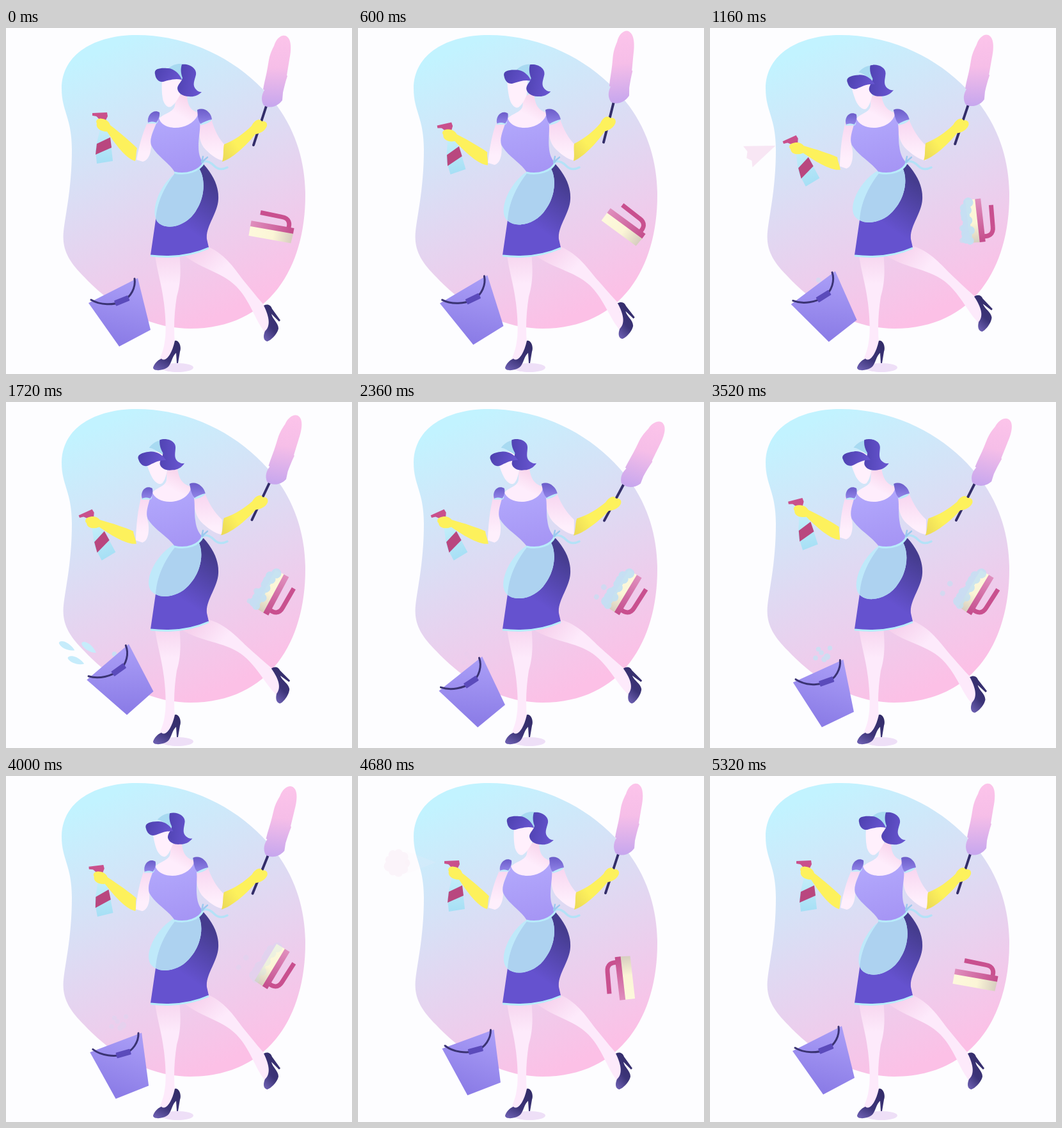
Recreate the animation shown at these times as an HTML page. Size 541 by 541 pixels, loop 5.36 s.

```html
<!DOCTYPE html>
<html lang="en">
<head>
<meta charset="utf-8">
<title>Cleaning</title>
<style>
html, body { margin: 0; width: 100%; height: 100%; overflow: hidden; background: #fdfdff; }
svg { display: block; width: 100vw; height: 100vh; }
</style>
</head>
<body>
<svg viewBox="0 0 541 541">
<defs>
  <linearGradient id="gBlob" gradientUnits="userSpaceOnUse" x1="150" y1="35" x2="335" y2="450"><stop stop-color="#c2f3ff"/><stop offset="1" stop-color="#fcc0e6"/></linearGradient>
  <linearGradient id="gSkirt" gradientUnits="userSpaceOnUse" x1="328" y1="245" x2="270" y2="330"><stop stop-color="#453c8e"/><stop offset=".8" stop-color="#6552cf"/></linearGradient>
  <linearGradient id="gDress" gradientUnits="userSpaceOnUse" x1="255" y1="140" x2="275" y2="230"><stop stop-color="#b2a8fc"/><stop offset="1" stop-color="#a594f4"/></linearGradient>
  <linearGradient id="gLeg" gradientUnits="userSpaceOnUse" x1="255" y1="350" x2="258" y2="400"><stop stop-color="#f6d4ee"/><stop offset="1" stop-color="#fdeafb"/></linearGradient>
  <linearGradient id="gLeg2" gradientUnits="userSpaceOnUse" x1="295" y1="345" x2="330" y2="385"><stop stop-color="#f6d0ec"/><stop offset="1" stop-color="#fdeafb"/></linearGradient>
  <linearGradient id="gArm" gradientUnits="userSpaceOnUse" x1="0" y1="145" x2="0" y2="195"><stop stop-color="#f8d6f0"/><stop offset="1" stop-color="#feeffc"/></linearGradient>
  <linearGradient id="gNeck" gradientUnits="userSpaceOnUse" x1="275" y1="108" x2="262" y2="132"><stop stop-color="#f9d8ee"/><stop offset="1" stop-color="#feedfc"/></linearGradient>
  <linearGradient id="gShoe" x1=".7" y1="0" x2=".2" y2="1"><stop stop-color="#332c69"/><stop offset=".6" stop-color="#3c3478"/><stop offset="1" stop-color="#6a5dae"/></linearGradient>
  <linearGradient id="gHair" x1="0" y1="0" x2="1" y2=".3"><stop stop-color="#4c40ae"/><stop offset="1" stop-color="#6654ce"/></linearGradient>
  <linearGradient id="gSleeve" x1="0" y1="0" x2="0" y2="1"><stop stop-color="#6b5cc9"/><stop offset="1" stop-color="#9084e8"/></linearGradient>
  <linearGradient id="gFeather" x1="0" y1="0" x2="0" y2="1"><stop stop-color="#fcc4ea"/><stop offset=".45" stop-color="#f6bee8"/><stop offset="1" stop-color="#c6a6ee"/></linearGradient>
  <linearGradient id="gBucket" gradientUnits="userSpaceOnUse" x1="200" y1="400" x2="178" y2="490"><stop stop-color="#a89cf6"/><stop offset="1" stop-color="#8c7de7"/></linearGradient>
  <linearGradient id="gGlove" gradientUnits="userSpaceOnUse" x1="340" y1="200" x2="362" y2="184"><stop stop-color="#eddc58"/><stop offset="1" stop-color="#fdf15c"/></linearGradient>
  <linearGradient id="gBristle"><stop stop-color="#fdf9dc"/><stop offset=".55" stop-color="#fbf5d6"/><stop offset="1" stop-color="#d6cdbf"/></linearGradient>
  <linearGradient id="gBar"><stop stop-color="#e08fbe"/><stop offset="1" stop-color="#c44d8c"/></linearGradient>
  <linearGradient id="gBottle" x1="0" y1="0" x2="0" y2="1"><stop stop-color="#c4eefa"/><stop offset="1" stop-color="#a6dff5"/></linearGradient>
  <clipPath id="skirtClip"><path id="skirt" d="M265 226L309 213C326 232 333 250 332 268C331 290 312 310 314 330L317 343C290 355 260 359 226 355L234 300C236 270 250 245 265 226Z"/></clipPath>
  <path id="apron" d="M265 227C280 227 292 222 300 217C312 232 312 262 298 284C285 308 255 317 240 306C228 297 232 275 240 258C247 244 255 234 265 227Z"/>
</defs>

<path fill="url(#gBlob)" d="M87 95C87 40 140 11 204 11C300 11 380 62 424 122C456 166 468 215 468 262C468 373 413 470 288 470C220 470 162 432 122 389C100 367 87 348 90 318C93 290 103 250 103 190C103 140 87 130 87 95Z"/>
<ellipse cx="268" cy="531" rx="25" ry="7" fill="#eedff7"/>

<g id="bubbles" fill="#bfe6f6"></g>
<g id="drops" fill="#c6ecfb"></g>
<g id="bucket">
  <path fill="url(#gBucket)" d="M129 430L206 391L226 472L177 498Z"/>
  <path fill="none" stroke="#3a3373" stroke-width="3" stroke-linecap="round" d="M133 425C148 434 168 433 181 428C196 421 203 405 201 392"/>
  <rect x="170" y="422" width="23" height="9" rx="1" fill="#5b4bbb" transform="rotate(-22 181 427)"/>
</g>

<g id="brush">
  <path fill="none" stroke="#c9508f" stroke-width="7" d="M-22 -21L12 -20C24 -20 27 -12 25 -2"/>
  <path fill="url(#gBristle)" d="M-34 2H34L33 18H-34Z"/>
  <rect x="-34" y="-6" width="68" height="9" fill="url(#gBar)"/>
  <g id="foam" fill="#c2e1f4"></g>
  <g id="stray" fill="#c6dff3"><circle cx="28" r="4"/><circle cx="9" cy="-2" r="4.500"/></g>
</g>

<g id="leg">
  <path fill="url(#gLeg2)" d="M272 350C300 376 336 380 360 404C380 424 390 456 402 472C404 476 406 478 408 474L414 462L408 438C400 430 388 415 374 398C358 378 345 355 316 342L290 340Z"/>
  <path fill="url(#gShoe)" d="M403 434C409 431 414 433 416 439L429 457L427 459L415 447C417 456 426 461 426 470C424 480 412 490 408 490C402 488 402 481 405 474C414 466 412 452 403 434Z"/>
</g>
<path fill="url(#gLeg)" d="M233 354C236 380 243 398 247 430C250 455 251 480 247 497C245 508 240 515 240 523L256 520L264 492C262 470 263 445 267 420C273 400 274 380 271 352Z"/>
<path fill="url(#gShoe)" d="M264 489C270 487 275 498 272 506L269 524H267L266 508C259 514 259 526 252 531C245 536 230 537 230 531C232 525 236 520 243 517C249 523 259 512 264 489Z"/>

<use href="#skirt" fill="url(#gSkirt)"/>
<path fill="none" stroke="#b6edfa" stroke-width="3" d="M226 356C260 360 290 356 317 344"/>
<use id="apronOut" href="#apron" fill="#bfe9fa"/>
<g clip-path="url(#skirtClip)"><use id="apronIn" href="#apron" fill="#add2f0"/></g>

<g id="torso">
  <path fill="url(#gArm)" d="M303 146C301 165 302 180 312 190C322 200 332 207 340 207L343 184C332 172 326 160 321 142Z"/>
  <path id="upperL" fill="url(#gArm)" d="M222 146C213 165 208 185 204 206L214 209C223 207 227 195 227 183C224 172 231 158 236 146Z"/>
  <path fill="url(#gNeck)" d="M236 147C240 134 262 134 264 121L266 108L283 100C283 115 285 128 300 132L302 140C286 162 250 160 236 147Z"/>
  <path id="face" fill="#fff0fc" d="M244 80C243 95 244 108 246 114C249 122 254 125 258 123C264 119 268 112 272 105L276 80C268 72 250 72 244 80Z"/>
  <path fill="url(#gDress)" d="M239 140C243 162 288 162 300 136C307 150 301 165 301 185C301 200 305 206 309 211C300 223 282 230 264 226C255 210 235 200 227 183C224 172 231 160 239 140Z"/>
  <path fill="none" stroke="#b8ebfa" stroke-width="3" d="M263 226C282 231 303 223 309 211"/>
  <g id="sleeveL">
    <path fill="#bfeafa" d="M221 150C226 149 233 150 236 149L238 145L222 146Z"/>
    <path fill="url(#gSleeve)" d="M222 148C220 136 231 126 240 132C241 139 238 143 235 148C231 146 226 146 222 148Z"/>
  </g>
  <path fill="#bfeafa" d="M303 148L321 142V145C316 149 309 151 304 152Z"/>
  <path fill="url(#gSleeve)" d="M299 128C310 123 321 132 322 143C316 144 309 147 304 150C299 142 300 135 299 128Z"/>
</g>
<path fill="none" stroke="#b4e2f7" stroke-width="3.500" stroke-linecap="round" d="M307 209C316 207 321 211 326 216C332 222 340 221 346 218"/>
<path fill="none" stroke="#9cc9ee" stroke-width="2.500" stroke-linecap="round" d="M306 210L308 201M307 210C311 204 314 204 315 202"/>

<path id="scarf" fill="#a8daf1" d="M253 64C262 56 271 55 278 57C276 64 277 74 278 82C270 80 264 68 253 64Z"/>
<path id="hair" fill="url(#gHair)" d="M275 57C286 55 299 63 297 73C295 82 290 90 298 97C301 100 304 100 306 100C300 106 293 108 286 107C276 107 268 101 268 94C269 87 275 84 276 78C273 70 273 63 275 57Z"/>
<path id="quiff" fill="url(#gHair)" d="M233 72C231 64 240 62 252 63C261 63 271 70 275 81C264 78 254 82 246 84C239 85 234 80 233 72Z"/>

<g id="foreR">
  <g id="duster">
    <path stroke="#332d69" stroke-width="4" stroke-linecap="round" d="M387 183L407 122"/>
    <path id="feather" fill="url(#gFeather)" d="M403 121C398 112 400 104 404 97L402 96C404 84 407 74 409 62L411 50C413 40 416 34 419 28C423 14 434 8 440 14C447 20 446 36 443 50L441 62L439 74L440 75C437 84 435 92 433 101L432 113C424 124 411 126 403 121Z"/>
  </g>
  <path fill="url(#gGlove)" d="M341 182C339 190 341 200 338 209C352 205 374 186 390 166C398 165 406 160 408 153C409 147 404 145 400 146C396 140 388 145 384 153C372 165 358 175 341 182Z"/>
</g>

<g id="foreL">
  <g id="spray">
    <path id="cone" fill="#f8e6f4" d="M122 135L75 117L78 127L73 136L79 143L76 153Z"/>
    <g id="cloud" fill="#fbf0f8"></g>
  </g>
  <path fill="url(#gBottle)" d="M147 156H158C160 165 163 172 164 180L167 208L142 212L140 192C141 178 146 168 147 156Z"/>
  <path fill="#b9477f" d="M142 181L163 171L165 187L140 198Z"/>
  <path fill="#c9508c" d="M135 133L158 132L159 138L156 144L157 156H148L147 143C144 142 143 139 141 138L135 137Z"/>
  <path fill="#fdf15c" d="M205 188C203 194 204 202 202 208C190 205 175 188 158 162C146 162 140 155 142 149C139 144 145 140 151 142C158 143 162 148 163 152C180 165 195 178 205 188Z"/>
</g>
</svg>

<script>
const LOOP = 5360, STEP = 40, SQUIRT = 640;
const squirts = [1080, 2680, 4200];
const $ = id => document.getElementById(id);
const clamp = x => Math.max(0, Math.min(1, x));
const move = (id, s) => $(id).setAttribute("transform", s);
const fade = (id, o) => $(id).setAttribute("opacity", o);

// Eased step from 0 to 1, and a rise followed by a fall.
function ramp(t, from, to) {
  const u = clamp((t - from) / (to - from));
  return u * u * (3 - 2 * u);
}
const pulse = (t, a, b, c, d) => ramp(t, a, b) - ramp(t, c, d);

let seed = 7;
const rand = (lo, hi) => lo + (hi - lo) * ((seed = seed * 16807 % 2147483647) / 2147483647);

function add(parent, tag, attrs) {
  const e = document.createElementNS("http://www.w3.org/2000/svg", tag);
  for (const k in attrs) e.setAttribute(k, attrs[k]);
  return $(parent).appendChild(e);
}
const dot = (parent, cx, cy, r) => add(parent, "circle", { cx, cy, r });

for (let x = -30; x <= 30; x += 4) dot("foam", x, rand(14, 24), rand(5, 8));
for (let i = 0; i < 6; i++) dot("bubbles", 165 + i * 4.5, rand(391, 411), rand(3, 5.5));
for (let a = 0; a < 6.2; a += Math.PI / 4.5) dot("cloud", 13 * Math.cos(a), 15 * Math.sin(a), rand(6, 8.5));
dot("cloud", 0, 0, 15);

const mouth = { x: 158, y: 408 };
const drops = [[96, 382, 20], [130, 384, 28], [110, 404, 14]].map(([x, y, turn]) =>
  ({ x, y, turn, el: add("drops", "path", { d: "M14 2C6 7 -8 6 -13 0C-14 -4 -8 -6 -2 -5C5 -4 10 -1 14 2Z" }) }));

function splash(t) {
  const u = clamp((t - 1440) / 560);
  const go = 1.3 * (1 - (1 - u) ** 2.2), size = clamp(u * 4) * clamp((1 - u) * 3);
  for (const { x, y, turn, el } of drops) {
    const px = mouth.x + (x - mouth.x) * go, py = mouth.y + (y - mouth.y) * go + 22 * (u * u - .25);
    el.setAttribute("transform", `translate(${px} ${py}) rotate(${turn}) scale(${size})`);
  }
}

function squirt(t) {
  const s = squirts.find(s => t >= s && t < s + SQUIRT);
  $("spray").style.display = s === undefined ? "none" : "";
  if (s === undefined) return;
  const u = t - s, reach = clamp((u + 30) / 110), grow = clamp((u - 80) / 200);
  move("cone", `translate(122 135) scale(${reach}) translate(-122 -135)`);
  fade("cone", 1 - clamp((u - 160) / 360));
  move("cloud", `translate(${80 - 19 * grow} 136) scale(${grow})`);
  fade("cloud", 1 - clamp((u - 400) / 240));
}

function body(t) {
  const lean = pulse(t, 200, 1000, 3400, 4700);
  const arm = pulse(t, 200, 1040, 2500, 4640);
  const nod = pulse(t, 200, 1700, 3400, 4680);
  // Shear that leaves the waist at y = 225 in place.
  move("torso", `matrix(1 0 ${lean / 8} 1 ${-225 * lean / 8} 0)`);
  move("upperL", `translate(0 146) scale(1 ${1 + .17 * arm}) translate(0 -146)`);
  move("sleeveL", `translate(0 ${3 * lean})`);
  move("face", `translate(${-5 * nod} ${3 * nod}) rotate(${-11 * nod} 265 105)`);
  move("hair", `translate(${-30 * nod} 0) rotate(${-11 * nod} 285 82)`);
  move("scarf", `translate(${-29 * nod} ${5 * nod}) rotate(${-11 * nod} 266 67)`);
  move("quiff", `translate(${-26 * nod} ${15 * nod}) rotate(${-11 * nod} 250 72)`);
  move("foreL", `translate(${-2 * arm} ${14 * arm}) rotate(${-22 * arm} 203 198)`);

  const wave = pulse(t, 1000, 2100, 3200, 4600);
  const raise = pulse(t, 0, 600, 600, 1160);
  const shift = wave - lean;
  move("foreR", `translate(${4 * shift} ${2 * shift}) rotate(${4.5 * wave - 4 * raise} 339 196)`);
  move("duster", `rotate(${5.5 * wave} 398 152)`);
  move("feather", `rotate(${7 * pulse(t, 1600, 2500, 3000, 4100)} 406 122)`);

  move("leg", `rotate(${-9 * pulse(t, 200, 1500, 2500, 4000)} 300 350)`);
  const swing = pulse(t, 200, 1000, 1800, 3000) + pulse(t, 3200, 3960, 4100, 5240);
  for (const id of ["apronOut", "apronIn"]) move(id, `rotate(${8 * swing} 300 218)`);
}

function bucket(t) {
  const turn = -13.7 * ramp(t, 0, 1760) + 20.4 * ramp(t, 1900, 4200) - 6.7 * ramp(t, 4680, 5280);
  const y = -9 * ramp(t, 0, 1500) + 20.5 * ramp(t, 1880, 2440) - 11.5 * ramp(t, 3200, 5320);
  move("bucket", `translate(0 ${y}) rotate(${turn} 184 448)`);
  fade("bubbles", .75 * (pulse(t, 1000, 1300, 1800, 2300) + pulse(t, 2300, 2900, 3300, 4300)));
  move("bubbles", `translate(0 ${-18 * ramp(t, 2900, 4300)})`);
}

function brush(t) {
  const scrub = pulse(t, 0, 1160, 4000, 5320), roll = pulse(t, 4000, 4680, 4680, 5320);
  const turn = 10 + 111 * ramp(t, 0, 1900) + 249 * ramp(t, 4000, 5240);
  move("brush", `translate(${416 + 5 * scrub - 7 * roll} ${313 - 12 * scrub + 9 * roll}) rotate(${turn})`);
  const lather = pulse(t, 700, 1160, 3300, 4360);
  fade("foam", .9 * lather);
  fade("stray", .7 * lather);
  move("stray", `translate(0 ${30 + 20 * ramp(t, 1500, 3300)})`);
}

const parts = [body, bucket, brush, splash, squirt];
const start = performance.now();
function tick() {
  const t = (performance.now() - start) % LOOP;
  for (const draw of parts) draw(Math.floor(t / STEP) * STEP);
  requestAnimationFrame(tick);
}
tick();
</script>
</body>
</html>
```
